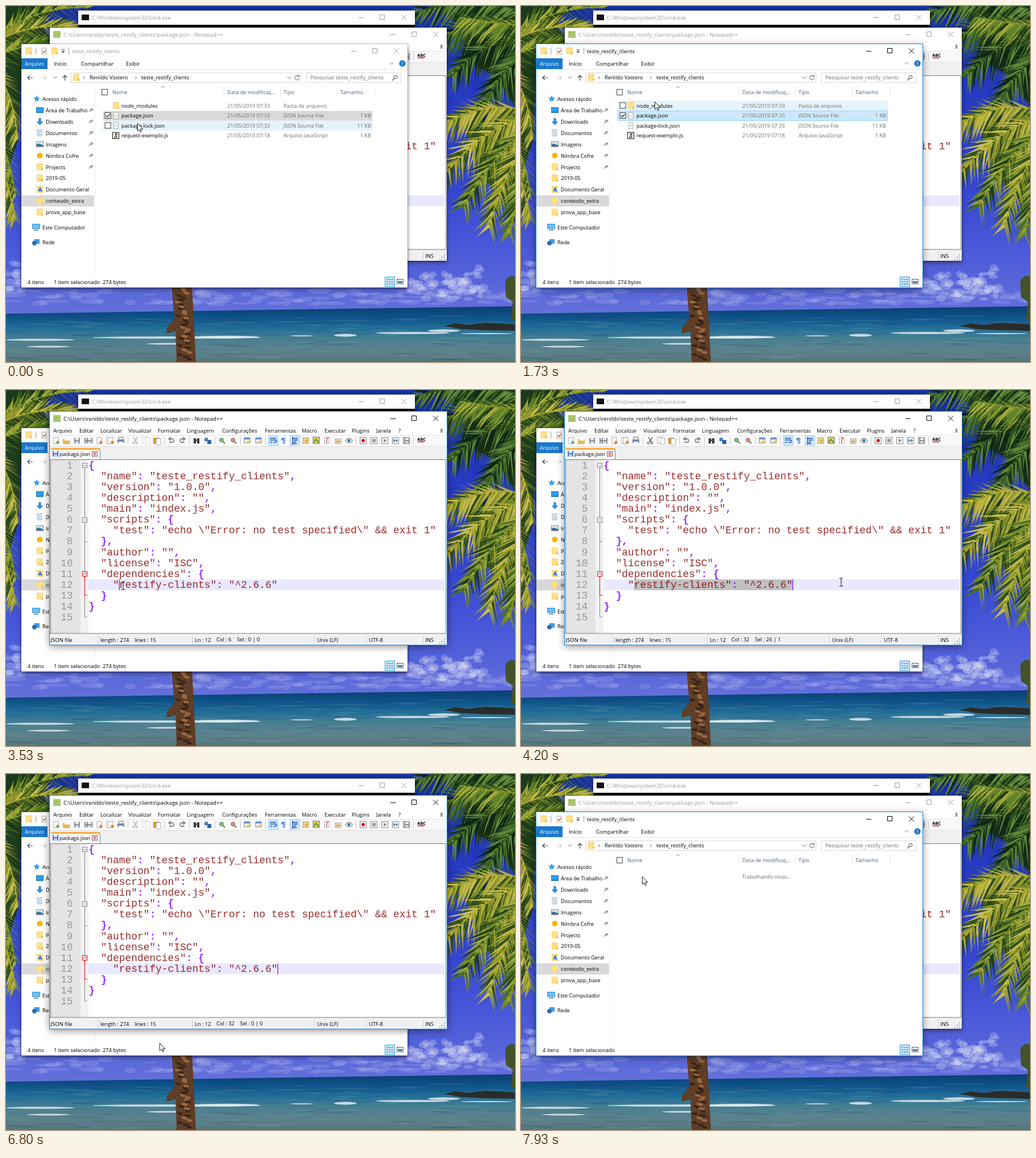
An HTML page with a canvas for the animation above (8000 ms loop, 895x626 px).

```html
<!DOCTYPE html>
<html lang="pt-BR">
<head>
<meta charset="utf-8">
<title>Desktop</title>
<style>
@property --col { syntax: "<integer>"; inherits: true; initial-value: 32; }
@property --sel { syntax: "<integer>"; inherits: true; initial-value: 0; }
@property --rows { syntax: "<integer>"; inherits: true; initial-value: 0; }
html, body { margin: 0; width: 100%; height: 100%; overflow: hidden; background: #2a38cc; }
#stage { position: absolute; left: 0; top: 0; width: 895px; height: 626px; overflow: hidden; }
#stage > * { position: absolute; }
canvas { left: 0; top: 0; }
svg { display: block; }
text, #pos { font: 9.25px "Open Sans", "Noto Sans", sans-serif; fill: #000; white-space: pre; }
.win { background: #fff; }
.win svg { position: absolute; left: 0; top: 0; }
#cmd { left: 127px; top: 8px; width: 592px; height: 60px; z-index: 1; box-shadow: 0 2px 8px #0006; }
#pad { left: 77px; top: 38px; width: 698px; height: 410px; }
#exp { left: 27px; top: 67px; width: 679px; height: 428px; z-index: 3; }
#cur { left: 0; top: 0; z-index: 9; }
#cur svg { position: absolute; left: -12px; top: -12px; }
.big { font-size: 9.5px; }
.tab { font-size: 8.95px; }
.tiny { font-size: 6px; fill: #7a9a5a; }
.abc { font-size: 7.6px; font-weight: bold; }
.white { fill: #fff; }
.dim { fill: #6d6d6d; }
.head { fill: #4c607a; }
.off { fill: #999; }
.end { text-anchor: end; }
.code { font: 17.86px "Courier New", "Liberation Mono", monospace; fill-opacity: .82; }
.str { fill: #800000; }
.op { fill: #8000ff; font-weight: bold; }
.num { fill: #8a8a8a; }
.ln { fill: none; stroke: currentColor; }
#sel { width: calc(var(--sel) * 10.72px); }
#caret { transform: translateX(calc((var(--col) - 1) * 10.72px)); }
#pos { position: absolute; left: 293px; top: 395.4px; line-height: 12px; color: #000; }
#pos::before { counter-reset: c var(--col); content: "Col : " counter(c) "    "; }
#pos::after { counter-reset: s var(--sel) r var(--rows); content: "Sel : " counter(s) " | " counter(r); }
</style>
</head>
<body>
<div id="stage">
  <canvas id="photo" width="895" height="626"></canvas>
  <div id="cmd" class="win"></div>
  <div id="pad" class="win"></div>
  <div id="exp" class="win"></div>
  <div id="cur">
    <svg id="arrow" width="40" height="40" viewBox="-12 -12 40 40"><path d="M.3 .3V14l3.1-2.9 2.1 4.7 2-.9-2-4.6h4.2z" fill="#fff" stroke="#000" stroke-width=".9"/></svg>
    <svg id="beam" width="40" height="40" viewBox="-12 -12 40 40"><path d="M-3.5-7h2.6l.9.8.9-.8h2.6M-3.5 7h2.6l.9-.8.9.8h2.6M0-6V6" fill="none" stroke="#222" stroke-width="1.1"/></svg>
    <svg id="size" width="40" height="40" viewBox="-12 -12 40 40"><path d="M-9 0l4.5-4.5v3.3h9v-3.3L9 0 4.5 4.5V1.2h-9v3.3z" fill="#fff" stroke="#000" stroke-width=".9"/></svg>
  </div>
</div>
<script>
const $ = id => document.getElementById(id);
const text = (x, y, s, c = '') => `<text x="${x}" y="${y}" class="${c}">${s}</text>`;
const rect = (x, y, w, h, fill, more = '') => `<rect x="${x}" y="${y}" width="${w}" height="${h}" fill="${fill}" ${more}/>`;
const line = (d, color, w = 1) => `<path d="${d}" fill="none" stroke="${color}" stroke-width="${w}"/>`;
const shape = (d, fill) => `<path d="${d}" fill="${fill}"/>`;
const dot = (x, y, r, fill, more = '') => `<circle cx="${x}" cy="${y}" r="${r}" fill="${fill}" ${more}/>`;
const group = (id, s) => `<g id="${id}">${s}</g>`;
const fit = (id, x, y, w, h, s) => {
  $(id).insertAdjacentHTML('afterbegin', `<svg width="${w}" height="${h}" viewBox="${x} ${y} ${w} ${h}">${s}</svg>`);
};
const buttons = (x, y) => `<g class="ln">${line(`M${x} ${y}.5h9M${x + 37.5} ${y - 4.5}h8v8h-8zM${x + 75} ${y - 4.5}l9 9m0-9l-9 9`, 'currentColor')}</g>`;
const folder = (x, y) => rect(x, y - 6, 11, 12, '#f5cf6b') + rect(x + 1, y - 5, 10, 11, '#ffe08d') + rect(x + 8, y + 2, 3, 4, '#eec155');
const page = (x, y, mark = '') => rect(x - 4, y - 5.5, 8, 11, '#fff', 'stroke="#9a9a9a" stroke-width=".8"') + mark;
const box = (y, on) => rect(174, y - 5, 10, 10, '#fff', 'stroke="#333"') + (on ? line(`M176 ${y}l2.3 2.5 4.2-5`, '#222', 1.2) : '');

/* command window */
fit('cmd', 127, 8, 592, 60,
  rect(127, 33, 592, 40, '#0c0c0c') + rect(133, 15, 13, 10, '#111') +
  text(151, 23.7, 'C:\\Windows\\system32\\cmd.exe', 'big off') +
  `<g style="color:#999">${buttons(620, 20)}</g>`);

/* text editor */
const menu = { Arquivo: 83, Editar: 129, Localizar: 166, Visualizar: 215, Formatar: 267, Linguagem: 318, 'Configurações': 380,
  Ferramentas: 455, Macro: 520, Executar: 560, Plugins: 608, Janela: 651, '?': 690, X: 763 };
const source = `{
  "name": "teste_restify_clients",
  "version": "1.0.0",
  "description": "",
  "main": "index.js",
  "scripts": {
    "test": "echo \\"Error: no test specified\\" && exit 1"
  },
  "author": "",
  "license": "ISC",
  "dependencies": {
    "restify-clients": "^2.6.6"
  }
}
`.split('\n');
const paint = s => s.replace(/"(?:\\.|[^"])*"|[{}:,]/g, m =>
  `<tspan class="${m[0] === '"' ? 'str' : 'op'}">${m.replace(/&/g, '&amp;')}</tspan>`);
const rowY = i => 138 + i * 19.07;
const code = source.map((s, i) => {
  const pad = s.length - s.trimStart().length;
  return text(117.5, rowY(i), i + 1, 'code num end') + text(145.2 + pad * 10.72, rowY(i), paint(s.trim()), 'code');
}).join('');

const save = x => rect(x - 5, 84, 10, 10, '#8a8f99') + rect(x - 3, 84, 6, 4, '#e8eaee') + rect(x - 3, 90, 6, 4, '#d5d8de');
const badge = (x, c) => page(x, 89, dot(x + 3, 92, 2.7, c));
const tile = (x, c) => rect(x - 5, 84, 10, 9, '#f7f7f7', 'stroke="#777"') + rect(x - 5, 84, 10, 3, c) + rect(x, 89, 5, 4, '#f0c24e');
const lens = (x, c) => line(`M${x + 1} 90l4 4`, '#8a6a3a', 2) + dot(x - 1, 88, 3.5, c, 'stroke="#777"');
const wrap = x => rect(x - 8.5, 80.5, 17, 17, '#cce8ff', 'stroke="#99d1ff"');
const tools = [
  badge(88, '#5cb85c'), shape('M100 86h4l1 1h7v8h-12z', '#e8b84a') + rect(103, 84, 8, 5, '#fff'), save(125),
  save(143) + save(147), badge(164, '#e0862f'), badge(181, '#bbb') + badge(184, '#e0862f'),
  rect(198, 83, 8, 5, '#eee', 'stroke="#777"') + rect(196, 87, 12, 6, '#7a8ea8') + rect(198, 91, 8, 4, '#fff'),
  group('clip', line('M224 83l5 8m2-8l-5 8', '#444', 1.3) + dot(224, 93, 2, 'none', 'stroke="#444"') + dot(230, 93, 2, 'none', 'stroke="#444"') + page(244, 88) + page(249, 90)),
  rect(259, 84, 10, 11, '#d79a3c') + page(268, 91),
  line('M287 86h6q4 3 0 6h-6m3-9l-4 3 4 3', '#888', 1.8), line('M314 86h-6q-4 3 0 6h6m-3-9l4 3-4 3', '#888', 1.8),
  rect(330, 85, 4, 9, '#333') + rect(336, 85, 4, 9, '#333') + rect(332, 87, 6, 3, '#555'),
  rect(349, 84, 6, 6, '#4a7fc4') + rect(354, 88, 7, 7, '#2f5fa8'), lens(380, '#7ac47a'), lens(400, '#e08a7a'),
  tile(424, '#5f93d0'), tile(444, '#5f93d0'),
  wrap(470) + line('M464 85h11M464 88h11q2 3-1 4h-4M464 92h4', '#2b579a', 1.4),
  shape('M491 84h-4q-3 0-3 2.5t3 2.5v6h1.3v-10h1v10h1.2z', '#4b86cf'),
  wrap(508) + line('M503 85h10M506 88h7M506 91h4M503 94h8M504 83v13', '#23459c', 1.4),
  rect(522, 84, 10, 10, '#f3dc8a', 'stroke="#999"') + shape('M529 85l-4 5h3l-2 4 5-5h-3z', '#e08a20'),
  rect(540, 83, 11, 11, '#e7d45c', 'stroke="#666"') + line('M541 92l4-5 5 5', '#3c8f50', 2),
  page(564, 89, line('M567 84q-4 0-3 9', '#c03030', 1.3)), rect(579, 86, 10, 8, '#f5e3bd', 'stroke="#999"') + rect(581, 89, 6, 3, '#d98f7a'),
  `<ellipse cx="603" cy="89" rx="6" ry="4" fill="#dce8f7" stroke="#666"/>` + dot(603, 89, 2.4, '#3c66a8'),
  ...[628, 647, 666, 685, 704].map(x => rect(x - 5.5, 83.5, 11, 11, '#f7f7f7', 'stroke="#8a8a8a"')),
  dot(628, 89, 3, '#e01818'), rect(644, 86, 6, 6, '#999'), shape('M664 85.5l5 3.5-5 3.5z', '#888'),
  shape('M681 86l4 3-4 3zM685.5 86l4 3-4 3z', '#3c78c8'), save(705),
  text(723, 88.5, 'ABC', 'abc') + line('M724 92l2-2 2 2 2-2 2 2 2-2 2 2', '#c03030', 1.3)
].join('');

const seps = [214, 278, 322, 367, 412, 456, 615, 716].map(x => `M${x}.5 82v14`).join('');
const sign = (y, c) => rect(134.5, y - 4, 8, 8, '#fff', `stroke="${c}"`) + line(`M136 ${y}h5`, c);
fit('pad', 77, 38, 698, 410,
  rect(83, 44, 13, 12, '#a8c66c') + text(101, 53.7, 'C:\\Users\\renildo\\teste_restify_clients\\package.json - Notepad++', 'big padtitle') +
  `<g class="padbtn">${buttons(676, 50)}</g>` +
  Object.entries(menu).map(([s, x]) => text(x, 74.6, s)).join('') +
  rect(77, 79, 698, 20, '#f9f9f9') + line('M77 79.5h698', '#e5e5e5') + line(seps, '#c8c8c8') + tools +
  rect(77, 99, 698, 350, '#f0f0f0') + line('M77 99.5h698', '#dcdcdc') +
  rect(79, 102, 86, 21, '#f7f7f7') + rect(79, 102, 86, 3, '#faaa3c') + line('M165.5 104v18', '#888') +
  rect(82, 107, 10, 10, '#3f78c4') + rect(84, 107, 6, 4, '#dfeafa') + rect(84, 113, 6, 4, '#bcd0ee') +
  text(94, 116.3, 'package.json', 'tab') + rect(151.5, 108.5, 9, 8, '#f4dede', 'stroke="#a06060"') + line('M154 110l4 5m0-5l-4 5', '#a03030') +
  rect(78, 122, 695, 306, '#fff') + rect(79, 123, 52, 305, '#e4e4e4') + rect(131, 123, 14, 305, '#f2f2f2') +
  rect(145, 333, 626, 19, '#e8e8ff') + `<rect id="sel" x="198.8" y="333" height="19" fill="#c0c0c0"/>` +
  line('M138.5 137v262h4M138.5 266.5h4', '#808080') + line('M138.5 328v33h4', '#e00000') +
  sign(132.5, '#808080') + sign(228.5, '#808080') + sign(323.5, '#e00000') + code +
  rect(145, 333, 1.2, 19, '#8000ff', 'id="caret"') +
  line('M77 122.5h697M78.5 122v306', '#777') + line('M773.5 122v306h-697', '#7a7a7a') +
  line([162, 327, 542, 633, 733].map(x => `M${x}.5 431v15`).join(''), '#d0d0d0') +
  text(78.5, 443, 'JSON file', 'big') + text(166, 443, 'length : 274    lines : 15') + text(332, 443, 'Ln : 12') +
  text(547, 443, 'Unix (LF)') + text(638, 443, 'UTF-8') + text(737, 443, 'INS', 'big') +
  [[771, 438], [771, 442], [767, 442], [771, 446], [767, 446], [763, 446]].map(([x, y]) => rect(x - 1, y - 1, 2, 2, '#aaa')).join(''));
$('pad').insertAdjacentHTML('beforeend', '<div id="pos"></div>');

/* file explorer */
const nav = [
  [163, 'Acesso rápido', shape('M54 157l1.8 4 4.2.4-3.2 2.8 1 4.3-3.8-2.3-3.8 2.3 1-4.3-3.2-2.8 4.2-.4z', '#3f9be0')],
  [183, 'Área de Trabalho', rect(53, 178, 13, 10, '#1a78c8') + rect(54, 179, 11, 7, '#2f9df0')],
  [203, 'Downloads', shape('M57.5 197h4v6h4l-6 6.5-6-6.5h4z', '#2f86d8')],
  [223, 'Documentos', page(59, 223, line('M56.5 220h5M56.5 223h5M56.5 226h5', '#4a8cc4'))],
  [243, 'Imagens', rect(53.5, 238.5, 12, 9, '#d8ecfa', 'stroke="#888"') + shape('M54 247v-4l5-1 6 3v2z', '#3f6fa8')],
  [263, 'Nimbra Cofre', dot(59.5, 263, 5, '#f4b400')],
  [283, 'Projects'], [302.5, '2019-05'], [322.5, 'Documento Geral', folder(54, 322.5) + dot(60, 321, 2, '#3f78c4') + rect(57, 323, 6, 3, '#3f78c4')],
  [342.5, 'conteudo_extra'], [362.5, 'prova_app_base'],
  [389, 'Este Computador', rect(46, 383, 14, 9, '#2f8fd8') + rect(47, 384, 12, 7, '#6cc0f5') + rect(49, 393, 8, 2, '#888')],
  [415.5, 'Rede', rect(50, 410, 9, 8, '#3f9be0') + dot(50, 417, 4, '#2c6fb0')]
];
const pin = y => line(`M146 ${y + 3}l3-3M147.5 ${y - 1.5}l3 3M149 ${y - 1}l2-2M150.5 ${y + .5}l2-2M150.5 ${y - 3}l3 3`, '#808a92', 1.1);
const side = nav.map(([y, s, icon], i) => (icon || folder(54, y)) + text(i && i < 11 ? 70 : 64, y + 3.7, s) +
  (i && i < 7 ? rect(143.5, y - 6, 12, 12, '#fff') + pin(y) : '')).join('');
const files = [
  ['node_modules', '33', 'Pasta de arquivos', ''],
  ['package.json', '33', 'JSON Source File', '1 KB'],
  ['package-lock.json', '33', 'JSON Source File', '11 KB'],
  ['request-exemplo.js', '18', 'Arquivo JavaScript', '1 KB']
];
const list = files.map(([name, min, kind, size], i) => {
  const y = 175.3 + i * 17.5;
  const icon = i === 0 ? folder(188, y - .3) : i === 3
    ? rect(187.5, y - 5.5, 11, 11, '#fff', 'stroke="#222" stroke-width="1.2"') + line(`M196 ${y - 3}q-6 0-2.5 3t-3.5 3`, '#444', 2) + dot(195, y, 1.5, '#c8b040')
    : page(193, y, text(190.3, y + 2, '{}', 'tiny'));
  return icon + text(203, y + 3.5, name) + text(389, y + 3.5, `21/05/2019 07:${min}`, 'dim') +
    text(488, y + 3.5, kind, 'dim') + text(642, y + 3.5, size, 'dim end');
}).join('');
const chev = (x, y) => `M${x - 1.5} ${y - 2.5}l2.5 2.5-2.5 2.5`;
const down = (x, y) => `M${x - 3} ${y - 1.5}l3 3 3-3`;
const band = (y, fill, edge = 'none') => rect(170.5, y, 474, 17, fill, `stroke="${edge}"`);

fit('exp', 27, 67, 679, 428,
  folder(34.5, 79) + line('M52.5 73v12M110.5 73v12', '#9a9a9a') + page(67, 79.5, line('M64.5 80l2 2 3.5-4.5', '#c05030', 1.3)) + folder(80, 79) +
  line('M97.5 77h6', '#333') + shape('M97.5 79.5h6l-3 3z', '#333') +
  text(116, 82.7, 'teste_restify_clients', 'exptitle') + `<g class="expbtn">${buttons(607, 79)}</g>` +
  rect(27, 92, 46, 19, '#1979ca') + text(33, 105, 'Arquivo', 'white') + text(84, 105, 'Início') + text(132, 105, 'Compartilhar') + text(211, 105, 'Exibir') +
  line('M73 111.5h633', '#e4e4e4') + line(down(678, 101), '#777') + dot(697, 101, 5.7, '#1979ca') + text(694.7, 104.5, '?', 'white') +
  line('M47 126h-9m4-4l-4 4 4 4M103.5 131v-9m-4 4l4-4 4 4', '#444', 1.2) + line('M62 126h9m-4-4l4 4-4 4', '#ccc', 1.2) + line(down(86.5, 125.5), '#666') +
  rect(114.5, 117.5, 404, 17, '#fff', 'stroke="#d9d9d9"') + folder(118, 125.5) + line(chev(137.5, 126) + chev(228.5, 126) + down(498, 126), '#555') +
  line('M504.5 118v17', '#e0e0e0') + line('M515 123.5a4 4 0 1 0 .8 3M515.5 121v3h-3', '#555') +
  text(147, 129.4, 'Renildo Vastero') + text(238, 129.4, 'teste_restify_clients') +
  rect(528.5, 117.5, 166, 17, '#fff', 'stroke="#d9d9d9"') + text(535.5, 129.4, 'Pesquisar teste_restify_clients', 'dim') +
  dot(685, 125, 3, 'none', 'stroke="#555"') + line('M683 127.5l-4 3.5', '#555', 1.3) +
  line('M157.5 141v334', '#f3f3f3') + rect(27, 333, 128, 19.5, '#d9d9d9') + side +
  rect(168.5, 146.5, 10, 10, '#fff', 'stroke="#444"') + line('M273 144l3-3 3 3', '#777') +
  [['Nome', 187], ['Data de modificaç...', 389], ['Tipo', 488], ['Tamanho', 588]].map(([s, x]) => text(x, 154.7, s, 'head')).join('') +
  line('M383.5 140v20M482.5 140v20M582.5 140v20M648.5 140v20', '#e4e4e4') +
  group('rows', group('hover', rect(170, 166.5, 475, 17.5, '#e5f3fb') + box(175)) +
    group('grey', band(184.5, '#d9d9d9')) + group('blue', band(184.5, '#cce8ff', '#99d1ff')) +
    group('focus', band(184.5, 'none', '#99d1ff')) + group('check', box(192.5, true)) +
    group('pick', band(167, '#cce8ff', '#99d1ff') + box(175, true)) + list) +
  group('busy', text(389, 184, 'Trabalhando nisso...', 'dim')) +
  text(38, 489.3, '4 itens') + group('one', text(84, 489.3, '1 item selecionado')) + group('bytes', text(170, 489.3, '274 bytes')) +
  rect(666.5, 476.5, 17, 17, '#cce8ff', 'stroke="#26a0da"') + line('M669 481h3m1 0h3m1 0h4M669 485h3m1 0h3m1 0h4M669 489h3m1 0h3m1 0h4', '#555', 1.1) +
  rect(687.5, 480.5, 11, 8, '#e9f2fa', 'stroke="#666"') + rect(689, 484, 8, 3, '#3f6fa8'));

/* timeline: [ms, declarations, steps until the next entry]; a negative time hides */
const show = (...times) => times.map(t => [Math.abs(t), `opacity:${t < 0 || Object.is(t, -0) ? 0 : 1}`]);
const at = (t, x, y, n) => [t, `transform:translate(${x}px,${y}px)`, n];
const row = (t, i) => [t, `transform:translateY(${i * 17.5}px);opacity:${i < 0 ? 0 : 1}`];
const glow = (edge, blur) => `box-shadow:0 0 0 1px ${edge},0 3px ${blur}px #0007`;
const lit = glow('#1883d7', 13), unlit = glow('#0003', 7);
const pad = (t, front, col, sel, n) =>
  [t, `z-index:${front ? 4 : 2};${front ? lit : unlit};--col:${col};--sel:${sel};--rows:${sel ? 1 : 0}`, n];
const black = t => [t, 'fill:#000;color:#000'], pale = t => [t, 'fill:#999;color:#999'];
const tracks = {
  '#cur': [at(0, 231, 206), at(70, 230, 201), at(130, 229, 198), at(270, 228, 196), at(330, 228, 194), at(400, 227, 193),
    at(1730, 235, 168, 4), at(2000, 240, 52), at(2070, 240, 52, 7), at(2530, 330, 256), at(2600, 320, 262, 8), at(3130, 199, 343),
    at(3400, 202, 343), at(3470, 204, 344), at(3530, 206, 344, 10), at(4200, 563, 338), at(4600, 552, 341), at(4670, 543, 344),
    at(4730, 536, 346), at(4930, 530, 344, 8), at(5470, 73, 133), at(5730, 74, 135), at(5800, 62, 120, 2), at(5930, 36, 98, 4),
    at(6200, 56, 300, 2), at(6330, 120, 458, 3), at(6530, 270, 473), at(7000, 270, 473, 4), at(7270, 239, 282, 5), at(7600, 213, 180)],
  '#arrow': show(0, -2270, 5800),
  '#beam': show(-0, 2270, -5400),
  '#size': show(-0, 5400, -5800),
  '#pad': [pad(0, false, 32, 0), pad(2000, true, 32, 0), pad(3130, true, 6, 0), pad(3600, true, 6, 1, 6),
    pad(4000, true, 32, 26), pad(4930, true, 32, 0), pad(6870, false, 32, 0)],
  '#exp': [[0, unlit], [600, lit], [2000, unlit], [6870, lit]],
  '.padtitle,.padbtn': [pale(0), black(2000), pale(6870)],
  '.exptitle,.expbtn': [pale(0), black(600), pale(2000), black(6870)],
  '#clip': [[0, 'opacity:.45'], [3600, 'opacity:1'], [4930, 'opacity:.45']],
  '#hover': [row(0, 2), row(70, -1), row(1730, 0), row(1800, -1), row(7400, 3), row(7470, 2), row(7530, 1), row(7600, 0)],
  '#grey': show(0, -70),
  '#blue': show(-0, 70, -6870),
  '#focus': show(-0, 6870, -7670),
  '#check': show(0, -6870),
  '#pick': show(-0, 7670),
  '#one': show(0, -6870, 7670),
  '#bytes': show(0, -6870),
  '#rows': show(0, -7930),
  '#busy': show(-0, 7930)
};
const css = Object.entries(tracks).map(([sel, frames], i) => {
  const end = [8000, frames[frames.length - 1][1]];
  const body = [...frames, end].map(([t, decl, n = 1]) => `${t / 80}%{${decl};animation-timing-function:steps(${n})}`);
  return `@keyframes k${i}{${body.join('')}}${sel}{animation:k${i} 8s -10ms infinite}`;
});
document.head.appendChild(document.createElement('style')).textContent = css.join('');

/* beach picture */
const g = $('photo').getContext('2d');
let seed = 11;
const rnd = () => (seed = seed * 16807 % 2147483647) / 2147483647;
const fade = (y0, y1, ...colors) => {
  const f = g.createLinearGradient(0, y0, 0, y1);
  colors.forEach((c, i) => f.addColorStop(i / (colors.length - 1), c));
  return f;
};
const poly = (fill, ...p) => {
  g.fillStyle = fill;
  g.beginPath();
  for (let i = 0; i < p.length; i += 2) g.lineTo(p[i], p[i + 1]);
  g.fill();
};
const puff = (x, y, rx, ry, fill) => {
  g.fillStyle = fill;
  g.beginPath();
  g.ellipse(x, y, rx, ry, 0, 0, 7);
  g.fill();
};
g.fillStyle = fade(0, 540, '#16309f', '#2138b8', '#2a3ccc', '#3446d4', '#4a5ad8', '#6470da');
g.fillRect(0, 0, 895, 626);
for (let i = 0; i < 130; i++) puff(rnd() * 895, 500 + rnd() * 24, 6 + rnd() * 16, 1.5 + rnd() * 4, '#c4c8ee30');
for (let i = 0; i < 70; i++) {
  const x = 705 + rnd() * 135, top = 482 - 24 * Math.abs(Math.sin(x / 21));
  puff(x, top + rnd() * (515 - top), 4 + rnd() * 7, 3 + rnd() * 4, '#dcdff64a');
}
for (let i = 0; i < 16; i++) puff(rnd() * 28, 450 + rnd() * 50, 8, 5, '#d4d8f448');
poly(fade(528, 626, '#0a3f74', '#0f5288', '#22709a', '#4a7f90', '#5c828c', '#56777c'), 0, 541, 895, 528, 895, 626, 0, 626);
for (let i = 0; i < 150; i++) {
  const y = 545 + rnd() * 78;
  puff(rnd() * 895, y, 10 + rnd() * 30, .8, rnd() < .5 ? '#0a3a5c38' : '#9cc0c430');
}
[[60, 587, 60, 1.8], [75, 599, 38, 1.5], [300, 583, 148, 2], [390, 582, 56, 2.2], [285, 594, 38, 1.5], [597, 579, 20, 2.6],
  [520, 580, 20, 1], [715, 575, 65, 2], [770, 571, 28, 2.5], [845, 576, 45, 1.2]].forEach(w => puff(...w, '#e8eef2d0'));
poly('#2a2c28', 772, 563, 790, 558, 812, 561, 845, 557, 895, 560, 895, 571, 840, 570, 800, 568);
poly('#44522c', 878, 482, 887, 474, 895, 476, 895, 556, 888, 550, 891, 520, 879, 512);
poly('#5f3d26', 291, 490, 327, 490, 334, 626, 300, 626, 298, 572, 283, 576, 282, 568, 296, 549);
for (let y = 494; y < 622; y += 4) {
  const x = 294 + (y - 490) * .055 + rnd() * 20;
  poly(rnd() < .5 ? '#9a6a44' : '#382418', x, y, x + 8 + rnd() * 5, y + 2, x + 8, y + 6, x + 1, y + 4);
}

// a palm frond: curved rib with drooping leaflets on both sides
const frond = (x0, y0, cx, cy, x1, y1, len, colors) => {
  const n = 60;
  for (let i = 1; i <= n; i++) {
    const u = i / n, v = 1 - u;
    const x = v * v * x0 + 2 * u * v * cx + u * u * x1, y = v * v * y0 + 2 * u * v * cy + u * u * y1;
    const a = Math.atan2(v * (cy - y0) + u * (y1 - cy), v * (cx - x0) + u * (x1 - cx));
    for (const s of [-1, 1]) {
      const b = a + s * (.5 + rnd() * .4), l = len * (.55 + .5 * Math.sin(u * 3)) * (.8 + rnd() * .4);
      const ex = x + Math.cos(b) * l, ey = y + Math.sin(b) * l + l * .3;
      poly(colors[Math.floor(rnd() * colors.length)], x - 2, y - 2, ex, ey, x + 2, y + 2);
    }
  }
  g.strokeStyle = colors[0];
  g.lineWidth = 2;
  g.beginPath();
  g.moveTo(x0, y0);
  g.quadraticCurveTo(cx, cy, x1, y1);
  g.stroke();
};
const shade = ['#33591f', '#16301a', '#4c7430', '#0e2416', '#668a3c'];
const leaf = ['#86962c', '#4a6e22', '#a8ac3c', '#1e3c18', '#64822a'];
const gold = ['#b0aa34', '#7a8c28', '#c8be54', '#30501c', '#94982e'];
// shadowed foliage behind the fronds
poly('#1c3a1c', 0, 0, 92, 0, 60, 30, 84, 66, 30, 66, 20, 240, 0, 300);
poly('#173018', 748, 0, 895, 0, 895, 176, 856, 120, 800, 92, 812, 40);
poly('#2c4a1c', 806, 206, 895, 190, 895, 372, 868, 330, 836, 300, 818, 250);
frond(-60, 110, 10, 0, 140, 2, 46, leaf);
frond(-60, 90, 30, 20, 126, 40, 42, gold);
frond(-60, 120, 20, 50, 110, 74, 42, leaf);
frond(-50, 90, 10, 120, 20, 230, 38, gold);
frond(-50, 190, 0, 220, 16, 330, 36, leaf);
frond(-50, 260, 0, 270, 16, 372, 30, gold);
frond(950, 30, 850, -30, 716, 12, 42, shade);
frond(950, 60, 850, 0, 762, 60, 46, shade);
frond(950, 60, 860, 40, 786, 120, 44, shade);
frond(950, 60, 880, 90, 836, 180, 44, shade);
frond(960, 30, 900, 40, 800, 20, 44, leaf);
frond(960, 200, 850, 150, 764, 214, 44, gold);
frond(960, 190, 860, 190, 776, 290, 46, gold);
frond(960, 200, 880, 220, 806, 350, 44, leaf);
frond(960, 210, 890, 240, 850, 386, 44, gold);
frond(960, 230, 910, 270, 886, 400, 40, leaf);
</script>
</body>
</html>
```
